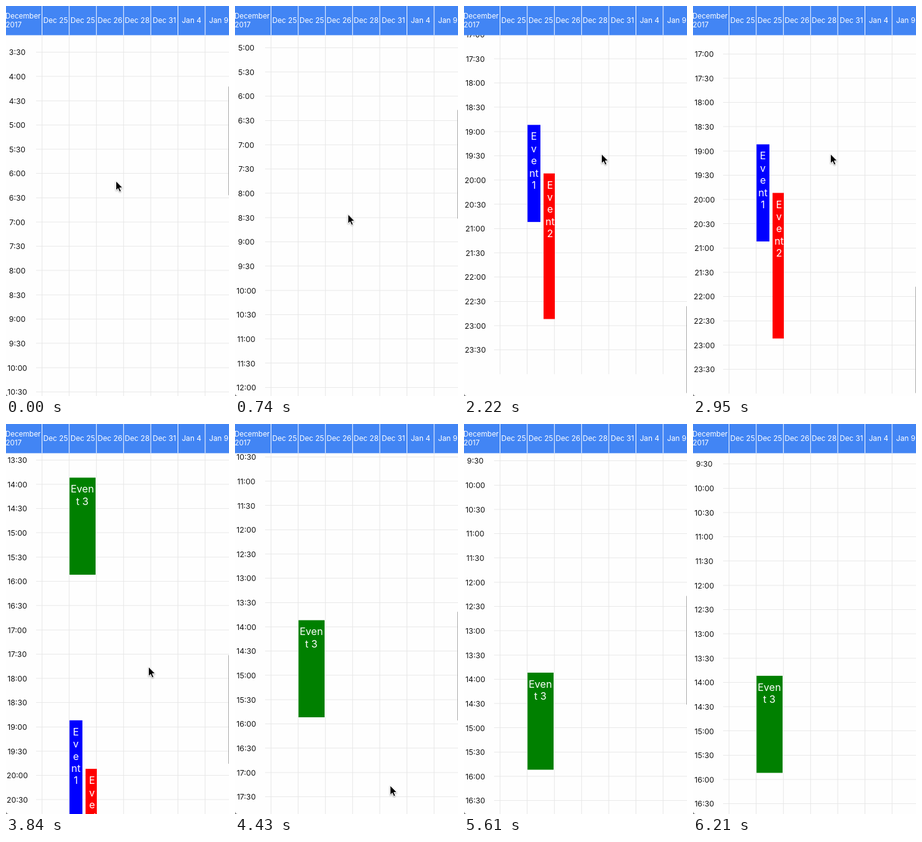
An HTML page that plays this animation: 356 px wide and 621 px high, repeating every 6360 ms.

```html
<!DOCTYPE html>
<html lang="en">
<head>
<meta charset="utf-8">
<title>Calendar scroll</title>
<style>
  html, body { margin: 0; width: 100%; height: 100%; overflow: hidden; background: #fefefe; }
  svg { display: block; width: 356px; height: 621px; font-family: Inter, Roboto, sans-serif; }
  .hour { font-size: 12.2px; fill: #111; text-anchor: middle; }
  .day { font-size: 11.7px; fill: #fff; text-anchor: middle; }
  .month { font-size: 11.5px; fill: #fff; }
  .event { font-size: 16px; fill: #fff; text-anchor: middle; }
  #cursor { filter: drop-shadow(0 1px 1px rgba(0, 0, 0, .35)); }
</style>
</head>
<body>
<svg viewBox="0 0 356 621">
  <defs><clipPath id="view"><rect y="46" width="356" height="575"/></clipPath></defs>
  <rect width="356" height="621" fill="#fefefe"/>
  <g clip-path="url(#view)"><g id="sheet"></g></g>
  <rect id="bar" x="355" width="3" rx="1" fill="#a9a9a9"/>
  <g id="header"></g>
  <path d="M0 617Q.5 620.5 4 621H0Z" fill="#777"/>
  <path id="cursor" d="M0 0V15L3.4 11.9L5.8 17.2L8.3 16.1L6 10.9H10.7Z"
        fill="#000" stroke="#fff" stroke-linejoin="round"/>
</svg>
<script>
const LOOP = 6360, STEPS = 43, STEP = LOOP / STEPS;
const ROW = 38.64, COLUMN = 43.4, LEFT = 57, MAX_SCROLL = 1233.7;
const days = ['Dec 25', 'Dec 25', 'Dec 26', 'Dec 28', 'Dec 31', 'Jan 4', 'Jan 9'];
const events = [
  { hour: 14, span: 2, x: 101.4, w: 41.6, color: '#008000', mid: 121.8, lines: ['Even', 't 3'] },
  { hour: 19, span: 2, x: 101.4, w: 20.6, color: '#0000ff', mid: 111.6, lines: ['E', 'v', 'e', 'nt', '1'] },
  { hour: 20, span: 3, x: 127, w: 18, color: '#ff0000', mid: 137.3, lines: ['E', 'v', 'e', 'nt', '2'] }
];

// Stops of the pointer; each move between them eases in and out.
const stops = [
  { at: 0, x: 176, y: 280 },
  { at: 3.2, x: 179, y: 456 },
  { at: 6.4, x: 182, y: 250 },
  { at: 10, x: 197, y: 464 },
  { at: 12.8, x: 220, y: 237 },
  { at: 23, x: 220, y: 237 },
  { at: 25.15, x: 228, y: 388 },
  { at: 26, x: 228, y: 388 },
  { at: 32, x: 255, y: 640 }
];

// A flick drags the sheet from press to release, then lets it coast.
const flicks = [
  { press: 3.2, release: 6.4, from: 197, coast: u => 566 * (1 - decay(u)) },
  { press: 10, release: 12.8, from: 793, coast: u => 213.7 + (189 * u - 213.7) * Math.exp(-.8 * u) },
  { press: 23, release: 25.15, from: MAX_SCROLL, coast: u => -414.5 * (1 - decay(u)) }
];
const decay = u => Math.exp(-u * STEP / 473);

const byId = id => document.getElementById(id);
const sheet = byId('sheet'), header = byId('header'), bar = byId('bar'), cursor = byId('cursor');
const clamp = v => Math.min(1, Math.max(0, v));

function set(el, attrs) {
  for (const key in attrs) el.setAttribute(key, attrs[key]);
}

function add(parent, tag, attrs, text) {
  const el = document.createElementNS('http://www.w3.org/2000/svg', tag);
  set(el, attrs);
  if (text) el.textContent = text;
  parent.append(el);
}

function build() {
  for (let i = 0; i < 48; i++) {
    const y = i * ROW;
    add(sheet, 'rect', { x: 48, y: Math.round(y * 2) / 2 - .5, width: 308, height: 1, fill: '#e9e9e9' });
    const label = Math.floor(i / 2) + (i % 2 ? ':30' : ':00');
    add(sheet, 'text', { class: 'hour', x: 18, y: y + 4.8 }, label);
  }

  add(header, 'rect', { width: 356, height: 46.5, fill: '#4285f4' });
  add(header, 'text', { class: 'month', x: -1, y: 20 }, 'December');
  add(header, 'text', { class: 'month', x: -.5, y: 34 }, '2017');
  days.forEach((day, i) => {
    const x = LEFT + COLUMN * i;
    add(sheet, 'rect', { x, y: -70, width: 1, height: 48 * ROW + 70, fill: '#e7e7e7' });
    add(header, 'rect', { x, width: 1, height: 46.5, fill: '#fff' });
    add(header, 'text', { class: 'day', x: x + 22.2, y: 27.4 }, day);
  });

  for (const e of events) {
    const y = e.hour * 2 * ROW - 10.5;
    add(sheet, 'rect', { x: e.x, y, width: e.w, height: e.span * 2 * ROW, fill: e.color });
    e.lines.forEach((line, i) =>
      add(sheet, 'text', { class: 'event', x: e.mid, y: y + 24 + i * 19.4 }, line));
  }
}

function pointerAt(n) {
  const i = stops.findIndex(s => s.at > n);
  if (i < 0) return stops[stops.length - 1];
  const a = stops[i - 1], b = stops[i];
  const k = (1 - Math.cos(Math.PI * (n - a.at) / (b.at - a.at))) / 2;
  return { x: a.x + (b.x - a.x) * k, y: a.y + (b.y - a.y) * k };
}

function scrollAt(n) {
  const flick = flicks.filter(f => f.press <= n).pop();
  if (!flick) return flicks[0].from;
  const held = Math.min(n, flick.release);
  const dragged = pointerAt(flick.press).y - pointerAt(held).y;
  return flick.from + dragged + (n > held ? flick.coast(n - held) : 0);
}

function draw(time) {
  const n = Math.floor((time + 10) / STEP) % STEPS;
  const scroll = scrollAt(n);
  set(sheet, { transform: `translate(0 ${-Math.round(scroll * 2) / 2})` });

  // The bar shrinks past the end and fades once the sheet rests.
  const over = Math.max(0, scroll - MAX_SCROLL);
  const rest = n <= 23 ? 20 : 40;
  set(bar, {
    y: 68 + .304 * (scroll - over) + over,
    height: 173.5 - over,
    opacity: clamp(1 - (n - rest) / 2)
  });

  const p = pointerAt(n);
  set(cursor, { transform: `translate(${p.x - .5} ${p.y - 1.3})` });
}

build();
const start = performance.now();
function tick() {
  draw((performance.now() - start) % LOOP);
  requestAnimationFrame(tick);
}
tick();
</script>
</body>
</html>
```
